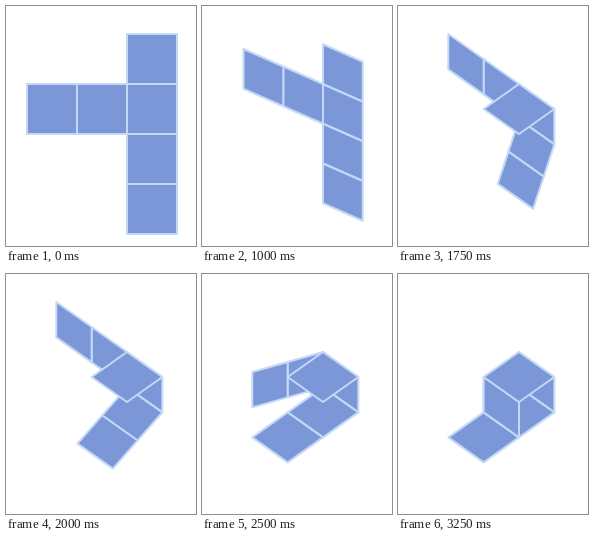
An HTML page that plays this animation: 190 by 240 pixels, repeating every 4 s.

```html
<!DOCTYPE html>
<html lang="en">
<head>
<meta charset="utf-8">
<title>Folding cube net</title>
<style>
  html, body { margin: 0; width: 100%; height: 100%; overflow: hidden; background: #fff; }
  svg { display: block; width: 100%; height: 100%; }
  polygon { fill: #7b97d7; stroke: #c4d9f8; stroke-width: 2; stroke-linejoin: round; }
</style>
</head>
<body>
<svg viewBox="0 0 190 240">
  <polygon/><polygon/><polygon/><polygon/><polygon/><polygon/>
</svg>
<script>
  const LOOP = 4000, START = 750, STEP = 250;
  const SIDE = 50, ISO = SIDE * Math.SQRT1_2;
  const HINGE = [121, 78];
  const RIGHT = [ISO, SIDE / 2], LEFT = [-ISO, SIDE / 2];

  const faces = document.querySelectorAll('polygon');

  const add = (p, q) => [p[0] + q[0], p[1] + q[1]];
  const neg = p => [-p[0], -p[1]];
  const mix = (p, q, t) => p.map((v, i) => v + (q[i] - v) * t);
  const quad = (o, a, b) => [o, add(o, a), add(add(o, a), b), add(o, b)].join(' ');

  // Each move takes three poses; the next one begins with its last pose.
  function progress(step, move, first = 0.3) {
    const n = step - 2 * move;
    return n < 0 ? 0 : n === 0 ? first : n === 1 ? 0.7 : 1;
  }

  function draw(step) {
    const turn = progress(step, 0, 0.41);
    const across = mix([SIDE, 0], RIGHT, turn);
    const down = mix([0, SIDE], [0, ISO], turn);
    const lid = mix(neg(down), LEFT, progress(step, 1, 0.41));
    const base = mix(down, LEFT, progress(step, 2));
    const arm = mix(neg(across), LEFT, progress(step, 3));
    const flap = mix(arm, RIGHT, progress(step, 4));
    const foot = add(HINGE, down);

    // back to front
    [
      quad(HINGE, across, down),
      quad(foot, across, base),
      quad(add(foot, base), across, base),
      quad(HINGE, arm, down),
      quad(add(HINGE, arm), flap, down),
      quad(HINGE, across, lid)
    ].forEach((points, i) => faces[i].setAttribute('points', points));
  }

  function tick() {
    const t = performance.now() % LOOP;
    draw(Math.floor((t - START) / STEP));
    requestAnimationFrame(tick);
  }
  tick();
</script>
</body>
</html>
```
